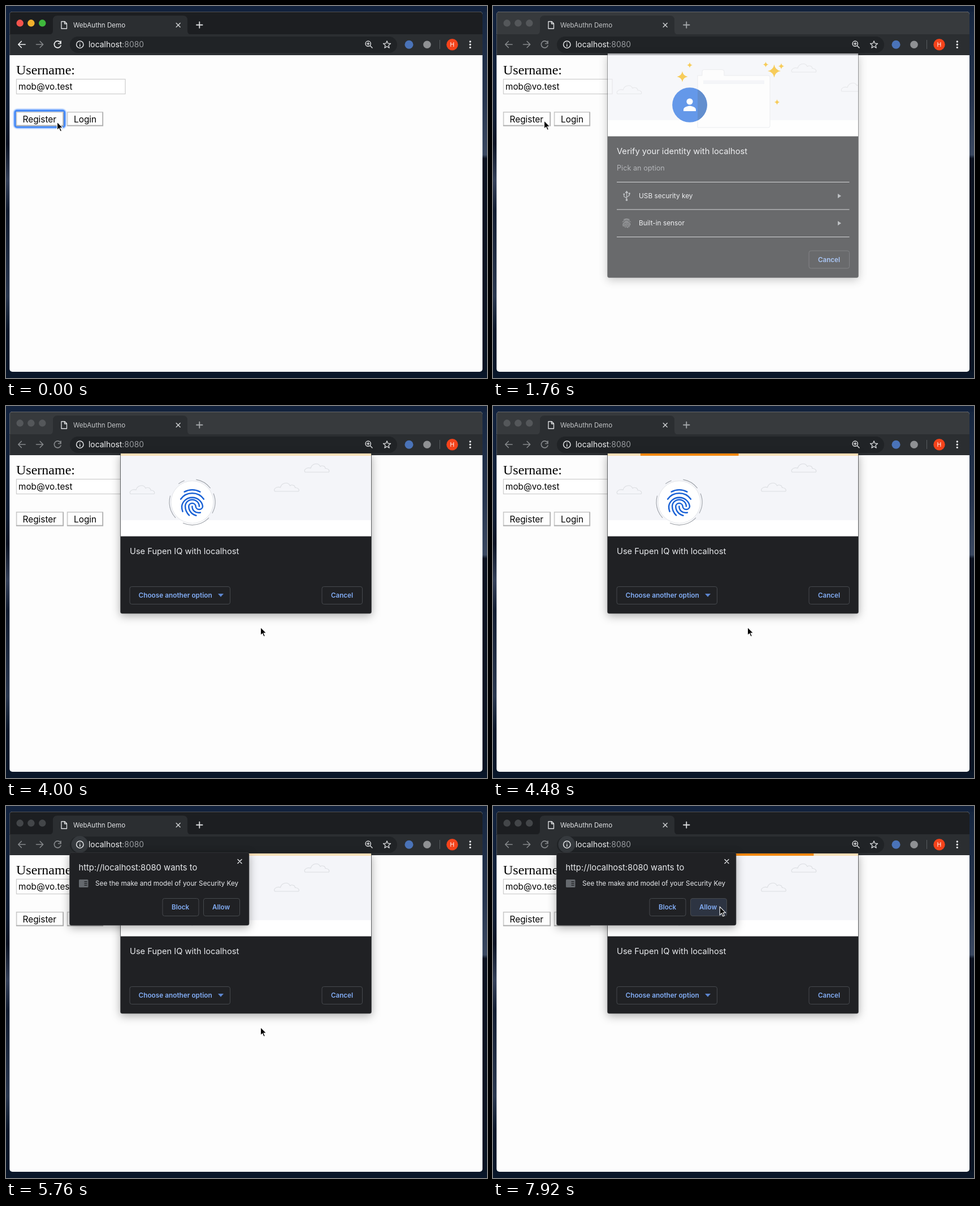
These frames come from a looping animation (851x658 px, 8 s). An HTML page:

```html
<!DOCTYPE html>
<html lang="en">
<head>
<meta charset="utf-8">
<title>WebAuthn Demo</title>
<style>
  html, body { margin: 0; width: 100%; height: 100%; overflow: hidden; background: #0d1a30; }
  svg { display: block; width: 851px; height: 658px; }
  text { font-family: Inter, Roboto, sans-serif; white-space: pre; }
  .serif { font-family: "Liberation Serif", serif; }
  .link { fill: #83aef6; font-weight: 600; font-size: 11.6px; }
  .line { fill: none; stroke-linecap: round; stroke-linejoin: round; }
  .btn { fill: none; stroke: #46494d; }
  .sheet { filter: drop-shadow(0 4px 8px rgba(0, 0, 0, .32)); }
  .system { filter: drop-shadow(0 14px 15px rgba(0, 0, 0, .75)); }
</style>
</head>
<body>
<svg viewBox="0 0 851 658" xmlns="http://www.w3.org/2000/svg">
  <defs>
    <linearGradient id="left" x2="0" y2="1">
      <stop offset="0" stop-color="#12233f"/>
      <stop offset=".3" stop-color="#0f1c33"/>
      <stop offset=".37" stop-color="#0a1222"/>
      <stop offset=".47" stop-color="#35415a"/>
      <stop offset=".55" stop-color="#111c31"/>
      <stop offset=".78" stop-color="#2a3850"/>
      <stop offset=".87" stop-color="#0a1629"/>
      <stop offset="1" stop-color="#081527"/>
    </linearGradient>
    <linearGradient id="right" x2="0" y2="1">
      <stop offset="0" stop-color="#14253f"/>
      <stop offset=".25" stop-color="#26344e"/>
      <stop offset=".4" stop-color="#3a4861"/>
      <stop offset=".41" stop-color="#0a1120"/>
      <stop offset=".8" stop-color="#0b1322"/>
      <stop offset="1" stop-color="#081424"/>
    </linearGradient>
    <linearGradient id="cap" x2="0" y2="1">
      <stop offset="0" stop-color="#383838"/>
      <stop offset="1" stop-color="#282828"/>
    </linearGradient>
    <filter id="glow" x="-20%" y="-40%" width="140%" height="180%"><feGaussianBlur stdDeviation="1.3"/></filter>
    <clipPath id="win"><rect x="6.300" y="10" width="836.700" height="637" rx="5"/></clipPath>
    <clipPath id="hero"><rect x="203" y="84" width="443" height="146.500"/></clipPath>
    <clipPath id="folder"><rect x="362" y="123" width="128" height="92"/></clipPath>
    <path id="cloud" d="M1 16C-2 11 5 7 11 9C13 1 24-2 28 6C32 3 37 6 37 9.500C43 9 45 14 43 16Z" fill="none" stroke="#dcdee2" stroke-width="1.100"/>
    <path id="spark" d="M0-10Q1.500-1.500 10 0Q1.500 1.500 0 10Q-1.500 1.500-10 0Q-1.500-1.500 0-10Z" fill="#f5b50a"/>
    <g id="print" class="line" stroke="currentColor">
      <path d="M6.200 4Q12 1 17.800 4M3.500 9.400C7.600 3.600 16.400 3.600 20.500 9.400"/>
      <path d="M14.900 21.500C11.500 20.600 9.400 17.800 9.400 14.700A2.580 2.440 0 0 1 14.550 14.700A2.580 2.440 0 0 0 19.700 14.700A7.750 7.330 0 0 0 4.300 14.700Q4.200 16.400 4.950 18.500"/>
      <path d="M9.750 21.300C7.800 19.400 6.840 17.200 6.840 14.700A5.160 4.900 0 0 1 17.160 14.700M11.940 14.700C11.940 17.600 14.300 20 18 19.300"/>
    </g>
    <path id="cross" class="line" d="M-3.500-3.500L3.500 3.500M3.500-3.500L-3.500 3.500" stroke-width="1.400"/>
  </defs>

  <!-- desktop -->
  <rect width="851" height="658" fill="url(#left)"/>
  <rect x="425" width="426" height="658" fill="url(#right)"/>
  <rect width="851" height="10" fill="#12223d"/>
  <rect y="647" width="851" height="11" fill="#091629"/>

  <!-- window -->
  <g clip-path="url(#win)">
    <rect x="6" y="10" width="838" height="638" fill="#fdfdfd"/>
    <rect id="strip" x="6" y="10" width="838" height="41"/>
    <path d="M6 10.500H843" stroke="#fff" stroke-opacity=".22"/>
    <path d="M75 51Q83 51 83 43V25Q83 17 91 17H313Q321 17 321 25V43Q321 51 329 51Z" fill="#2b2e31"/>
    <rect x="6" y="50" width="838" height="37" fill="#2b2e31"/>
    <rect x="113" y="54" width="579" height="29" rx="14.500" fill="#202326"/>
  </g>
  <g id="lights">
    <circle cx="24.700" cy="30.300" r="6.200"/><circle cx="44.400" cy="30.300" r="6.200"/><circle cx="64.300" cy="30.300" r="6.200"/>
  </g>
  <path class="line" d="M98 27.500H104L107.500 31V40H98ZM103.500 27.500V31.500H107.500" stroke="#e3e5e7" stroke-width="1.300"/>
  <text id="title" x="119" y="38" font-size="11.600">WebAuthn Demo</text>
  <use href="#cross" x="304.700" y="33.700" stroke="#d0d2d4"/>
  <path id="plus" class="line" d="M337 33.500H347.600M342.300 28.200V38.800" stroke-width="1.800"/>
  <g id="nav" class="line" stroke-width="1.700">
    <path d="M34 68H22M27.300 62.500L21.800 68L27.300 73.500"/>
    <path d="M96.300 64.500A6 6 0 1 0 97 70M97 62.200V66.500H92.700"/>
  </g>
  <path class="line" d="M53.500 68H65.500M60.200 62.500L65.700 68L60.200 73.500" stroke="#85888b" stroke-width="1.600"/>
  <circle id="info" cx="130.500" cy="68" r="15" fill="#363a3e"/>
  <g class="line" stroke="#e4e6e8" stroke-width="1.500">
    <circle cx="130.800" cy="68.200" r="6.200"/>
    <path d="M130.800 68V71.300M130.800 65.200V65.300"/>
  </g>
  <text x="146" y="73.200" font-size="13.900" fill="#f0f1f2">localhost<tspan fill="#989b9f">:8080</tspan></text>
  <g class="line" stroke="#d8dadc" stroke-width="1.500">
    <circle cx="640.700" cy="66.700" r="4.600"/>
    <path d="M644.200 70.200L648 74M638.600 66.700H642.800M640.700 64.600V68.800"/>
    <path d="M674 61.800L675.800 66.200L680.500 66.500L676.900 69.500L678.100 74.100L674 71.500L669.900 74.100L671.100 69.500L667.500 66.500L672.200 66.200Z" stroke-width="1.300"/>
  </g>
  <circle cx="713" cy="68.200" r="7.500" fill="#4a73b8"/>
  <circle cx="745" cy="68.200" r="6.800" fill="#8f9194"/>
  <path d="M767.500 60V76" stroke="#585c60"/>
  <circle cx="789.500" cy="68.200" r="10.200" fill="#f4431b"/>
  <text x="789.500" y="72.200" font-size="10.500" fill="#fff" text-anchor="middle">H</text>
  <g fill="#e8eaec"><circle cx="821.300" cy="63" r="1.700"/><circle cx="821.300" cy="68.200" r="1.700"/><circle cx="821.300" cy="73.400" r="1.700"/></g>

  <!-- page -->
  <text class="serif" x="18" y="121" font-size="24">Username:</text>
  <rect x="18.500" y="129.500" width="192.500" height="26" fill="#fff" stroke="#cfcfcf" stroke-width="1.300"/>
  <text x="22" y="148.300" font-size="15.300">mob@vo.test</text>
  <g id="ring">
    <rect x="15.500" y="184.500" width="88.500" height="30" rx="4" fill="none" stroke="#5d9bff" stroke-width="4" filter="url(#glow)"/>
    <rect x="16.300" y="185.300" width="87" height="28.500" rx="3" fill="none" stroke="#4287f5" stroke-width="2.800"/>
  </g>
  <g fill="#fdfdfd" stroke="#c9c9c9" stroke-width="1.600">
    <rect x="18.600" y="187.700" width="82.600" height="23.800"/>
    <rect x="108.600" y="187.700" width="62.600" height="23.800"/>
    <path d="M18 211.600H101.300V188M108 211.600H171.300V188" fill="none" stroke="#adadad"/>
  </g>
  <text x="29.500" y="205.600" font-size="15.400">Register</text>
  <text x="120" y="205.600" font-size="15.400">Login</text>

  <!-- browser sheet -->
  <g id="sheet" class="sheet">
    <path id="panel" fill="#202124" stroke="#4b4d50" stroke-width=".6"/>
    <g clip-path="url(#hero)">
      <rect x="203" y="84" width="443" height="147" fill="#fff"/>
      <rect x="203" y="84" width="443" height="118" fill="#f4f5f9"/>
      <use href="#cloud" x="219" y="139.500"/>
      <use href="#cloud" x="528" y="101"/>
      <use id="drift" href="#cloud" y="135"/>
    </g>
    <g id="pick">
      <path d="M362 215V123H370V116Q370 112.500 373.500 112.500H405Q409 112.500 409 116.500V123H487Q490 123 490 126V212Q490 215 487 215Z" fill="#fdfdfe" stroke="#e3e5e9"/>
      <rect x="372" y="131.500" width="108" height="6.500" fill="#f1f2f6"/>
      <circle cx="348" cy="175" r="30.800" fill="#1967e0"/>
      <circle cx="348" cy="175" r="30.800" fill="#1557b8" clip-path="url(#folder)"/>
      <circle cx="348" cy="169" r="5.600" fill="#fff"/>
      <path d="M337 186V183.500C337 179 344 176.800 348 176.800S359 179 359 183.500V186Z" fill="#fff"/>
      <use href="#spark" transform="translate(335 125)scale(.95)"/>
      <use href="#spark" transform="translate(348 104.500)scale(.5)"/>
      <use href="#spark" transform="translate(482.500 103.500)scale(.5)"/>
      <use href="#spark" transform="translate(497.500 115)scale(1.150)"/>
      <use href="#spark" transform="translate(510 106.500)scale(.52)"/>
      <use href="#spark" transform="translate(502.500 170)scale(.5)"/>
      <text x="219" y="262" font-size="14.650" fill="#e8eaed">Verify your identity with localhost</text>
      <text x="219" y="290.500" font-size="12.700" fill="#8f9398">Pick an option</text>
      <rect id="hover" x="219" width="411.500" height="48" fill="#2f3033"/>
      <path d="M219 311.500H630.500M219 360H630.500M219 408.500H630.500" stroke="#bfc1c4" stroke-width="1.200"/>
      <g class="line" stroke="#a0a4a9" stroke-width="1.300">
        <path d="M236.500 329V343M236.500 340L231.800 337V333.500M236.500 338L241.300 335V332"/>
        <path d="M234.600 330.300L236.500 327.500L238.400 330.300Z" fill="#a0a4a9"/>
        <circle cx="236.500" cy="343" r="1.200" fill="#a0a4a9"/>
        <circle cx="231.800" cy="333" r=".8"/>
        <path d="M240.500 331H242.100V332.600H240.500Z"/>
      </g>
      <use href="#print" color="#a0a4a9" transform="translate(226.400 374.200)scale(.83)" stroke-width="1"/>
      <text x="258" y="340" font-size="11.850" fill="#e8eaed">USB security key</text>
      <text x="258" y="388.300" font-size="11.850" fill="#e8eaed">Built-in sensor</text>
      <path d="M610 332V340L616 336ZM610 380.300V388.300L616 384.300Z" fill="#a0a4a9"/>
    </g>
    <g id="touch">
      <circle cx="329.500" cy="170" r="37.500" fill="#fff" stroke="#e3e5e9"/>
      <circle cx="329.500" cy="170" r="40.500" fill="none" stroke="#9fa3a9" stroke-width="1.100" stroke-dasharray="36 10 50 16 42 26 12 21 30 12" transform="rotate(-22 329.500 170)"/>
      <use href="#print" color="#1a62d6" transform="translate(300.700 142.200)scale(2.400)" stroke-width="1.050"/>
      <text x="219" y="262" font-size="14.650" fill="#e8eaed">Use Fupen IQ with localhost</text>
      <rect class="btn" x="219" y="319.500" width="177.500" height="31" rx="3.500"/>
      <text class="link" x="234.500" y="339.200" style="font-size:11.800px">Choose another option</text>
      <path d="M375 332H385L380 337.800Z" fill="#5d86cf"/>
      <rect x="203" y="84" width="443" height="4" fill="#fbdfb6"/>
      <rect class="bar" y="84" height="4" fill="#f5870a"/>
      <rect class="bar" y="84" height="4" fill="#f5870a"/>
    </g>
    <g id="cancel">
      <rect class="btn" x="559" y="433" width="71.500" height="31" rx="3.500"/>
      <text class="link" x="575" y="452.700">Cancel</text>
    </g>
  </g>

  <!-- system prompt -->
  <g id="system" class="system">
    <rect x="193.400" y="51.500" width="440.400" height="161.500" rx="5.500" fill="#2a2a2a"/>
    <path d="M194 73V57Q194 52 199 52H628Q633 52 633 57V73Z" fill="url(#cap)"/>
    <path d="M194 73H633" stroke="#1a1a1a"/>
    <rect x="193.900" y="52" width="439.400" height="160.500" rx="5" fill="none" stroke="#626262"/>
    <circle cx="245.800" cy="124.200" r="28" fill="#f4eff0"/>
    <circle cx="245.800" cy="124.200" r="22.500" fill="#e8788a"/>
    <circle cx="259.500" cy="140.500" r="14" fill="#f6c12b"/>
    <g fill="#ececec">
      <text x="289" y="105.700" font-size="12.750" font-weight="700">“Bramow Quendo” is trying to verify your identity</text>
      <text x="289" y="121.500" font-size="12.750" font-weight="700">on localhost.</text>
      <text x="289" y="143.300" font-size="10.900">Fupen IQ or enter your password to allow this.</text>
      <rect x="409.500" y="172.500" width="122" height="19.500" rx="3" fill="#5e5e5e"/>
      <rect x="545" y="172.500" width="67.500" height="19.500" rx="3" fill="#5e5e5e"/>
      <text x="422" y="186.700" font-size="12.450">Use Password...</text>
      <text x="558" y="186.700" font-size="12.450">Cancel</text>
    </g>
  </g>

  <!-- permission bubble -->
  <g id="ask" class="sheet">
    <rect x="112.500" y="82.500" width="317.500" height="128.500" rx="3" fill="#202124" stroke="#3d3f42" stroke-width=".6"/>
    <text x="128.500" y="113.500" font-size="14.750" fill="#e8eaed">http://localhost:8080 wants to</text>
    <use href="#cross" x="413.500" y="98" stroke="#e8eaed" stroke-width="1.600"/>
    <rect x="129" y="130" width="16.500" height="14" rx="1.500" fill="#65696e"/>
    <path d="M138.500 133.800H143.500M138.500 137H143.500M138.500 140.200H143.500" stroke="#25272a" stroke-width="1.400"/>
    <text x="158" y="141.300" font-size="11.750" fill="#e8eaed">See the make and model of your Security Key</text>
    <rect class="btn" x="277" y="163.500" width="64" height="31" rx="3.500"/>
    <rect id="allow" x="349.500" y="163.500" width="64" height="31" rx="3.500" fill="#2d3442"/>
    <rect class="btn" x="349.500" y="163.500" width="64" height="31" rx="3.500"/>
    <text class="link" x="293" y="183">Block</text>
    <text class="link" x="365" y="183">Allow</text>
  </g>

  <path id="cursor" d="M0 0V14.400L3.300 11.300L5.600 16.700L8 15.700L5.700 10.400H10.200Z" fill="#000" stroke="#fff" stroke-width="1.100"/>
</svg>
<script>
  const LOOP = 8000, TICK = 80;
  const $ = id => document.getElementById(id);
  const set = (el, attrs) => { for (const k in attrs) el.setAttribute(k, attrs[k]); };
  const show = (id, on) => set($(id), { visibility: on ? 'visible' : 'hidden' });
  const fade = (id, a) => { $(id).style.opacity = a; show(id, a > 0); };
  const clamp = v => Math.max(0, Math.min(1, v));
  const ramp = (t, from, to) => clamp((t - from) / (to - from));
  const ease = v => v * v * (3 - 2 * v);

  // time, x, y of the pointer tip
  const path = [
    [80, 90.5, 205.2], [640, 90.5, 202.8], [2320, 90.5, 202.8], [2960, 410, 368],
    [3200, 415.5, 371.5], [3760, 450.4, 391.3], [6560, 450.4, 391.3], [7280, 401.3, 178.3]
  ];
  function pointer(t) {
    let p = path[0];
    for (const q of path) {
      if (t < q[0]) {
        const k = ease(ramp(t, p[0], q[0]));
        return [p[1] + (q[1] - p[1]) * k, p[2] + (q[2] - p[2]) * k];
      }
      p = q;
    }
    return [p[1], p[2]];
  }

  // indeterminate progress: [left, width] of both slices, as fractions
  function slices(v) {
    if (v < 0.5) return [[v / 2, v * 1.5], [0, 0]];
    if (v < 0.75) return [[v * 3 - 1.25, 0.75 - (v - 0.5) * 3], [0, v - 0.5]];
    return [[1, 0], [(v - 0.75) * 4, 1 - v]];
  }

  const bars = document.querySelectorAll('.bar');
  const lamps = [...$('lights').children];
  const lit = ['#f2544d', '#f0b02c', '#3fb83c'];

  function draw(t) {
    const modal = t >= 1680, idle = modal && t < 5680, touch = t >= 4000;
    const [x, y] = pointer(t);
    set($('cursor'), { transform: `translate(${x} ${y})` });

    set($('strip'), { fill: idle ? '#373a3d' : '#1c1e21' });
    set($('title'), { fill: idle ? '#c3c5c7' : '#e1e3e5' });
    set($('plus'), { stroke: idle ? '#a5a8ab' : '#dcdee0' });
    set($('nav'), { stroke: modal ? '#85888b' : '#f1f2f3' });
    lamps.forEach((c, i) => set(c, { fill: t < 1360 ? lit[i] : idle ? '#54575a' : '#434649' }));
    fade('ring', 1 - ramp(t, 1280, 1520));

    fade('sheet', ramp(t, 1600, 1840));
    const bottom = touch ? 367 : 480.5;
    set($('panel'), { d: `M202.500 84H646.500V${bottom - 3}q0 3-3 3H205.500q-3 0-3-3Z` });
    set($('drift'), { x: touch ? 474.5 : 616 });
    set($('cancel'), { transform: `translate(0 ${touch ? -113.5 : 0})` });
    $('pick').style.display = touch ? 'none' : '';
    $('touch').style.display = touch ? '' : 'none';

    const row = Math.floor((y - 311.5) / 48.5);
    const over = x > 219 && x < 630 && (row === 0 || row === 1);
    set($('hover'), { y: 312 + row * 48.5, opacity: over ? 1 : 0 });

    const phase = t < 4062 ? 0 : (t - 4062) / 1600 % 1;
    slices(phase).forEach(([l, w], i) => set(bars[i], { x: 203 + 443 * l, width: 443 * w }));

    fade('system', t < 5680 ? ramp(t, 4800, 5040) : 0);
    fade('ask', ramp(t, 5600, 5760));
    show('info', t >= 5680);
    fade('allow', 0.6 * ramp(t, 7120, 7280) + 0.4 * ramp(t, 7600, 7840));
  }

  const start = performance.now();
  function frame() {
    const t = (performance.now() - start) % LOOP;
    draw(Math.floor(t / TICK) * TICK);
    requestAnimationFrame(frame);
  }
  draw(0);
  requestAnimationFrame(frame);
</script>
</body>
</html>
```
